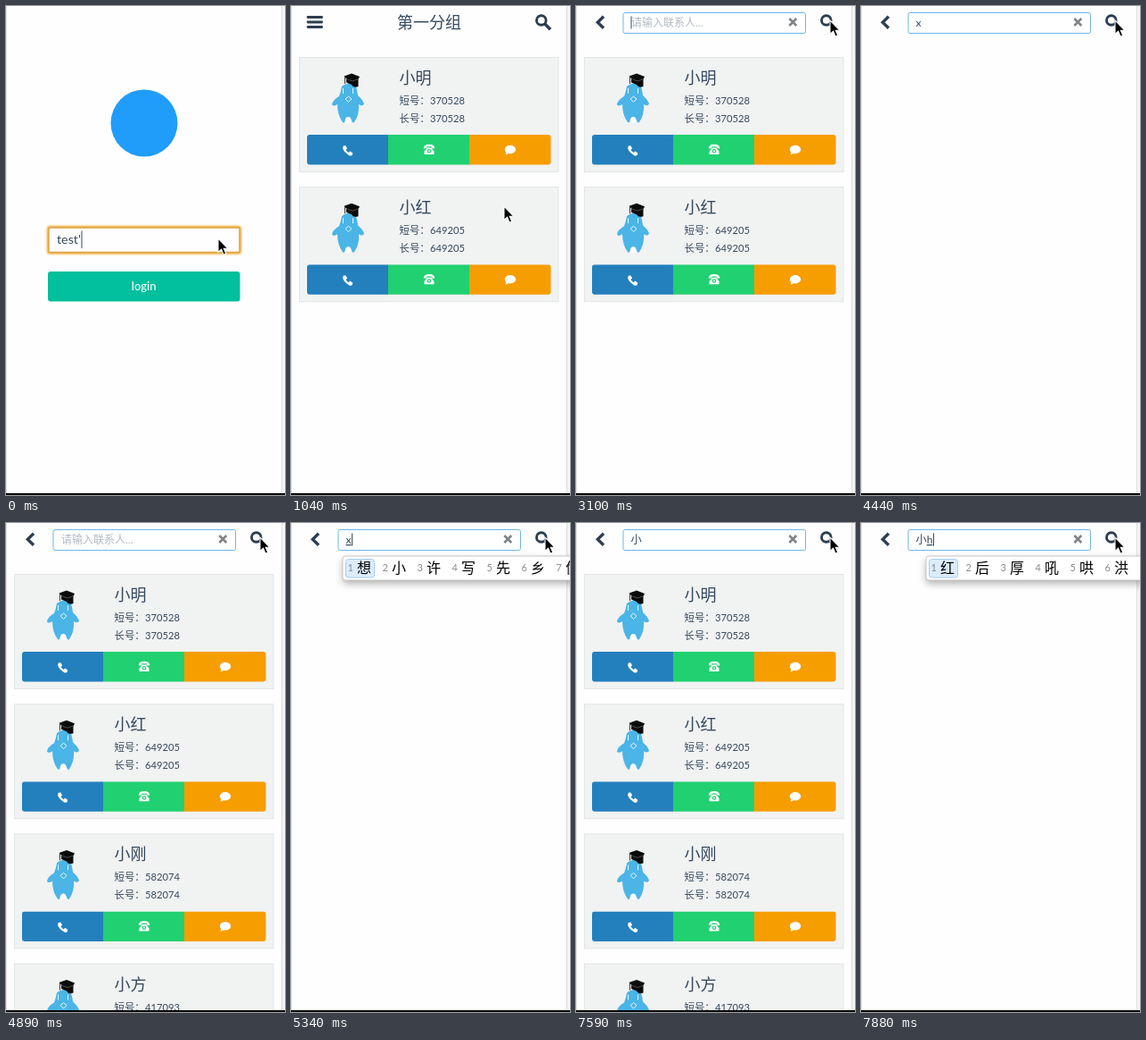
An HTML page that plays this animation: 313 px wide and 547 px high, repeating every 8 s.

```html
<!DOCTYPE html>
<html lang="zh">
<head>
<meta charset="utf-8">
<title>Contacts</title>
<style>
html, body { margin: 0; width: 100%; height: 100%; overflow: hidden; background: #fefefe; }
svg { display: block; width: 313px; height: 547px; }
text { font-family: Lato, "Noto Sans CJK SC", "Noto Sans CJK", sans-serif; fill: #34495e; white-space: pre; }
.big { font-size: 18px; }
.label { font-size: 11.4px; }
.num { font-size: 11.2px; }
.query { font-size: 12.2px; }
.hint { font-size: 12px; fill: #b2bac2; }
.index { font-size: 11px; fill: #8b8b8b; }
.word { font-size: 16px; font-weight: 500; fill: #000; }
.ink { fill: none; stroke: #2c3e50; }
.compose { text-decoration: underline; }
.hidden { display: none; }
</style>
</head>
<body>
<svg viewBox="0 0 313 547">
  <defs>
    <filter id="glow" x="-10%" y="-50%" width="120%" height="200%"><feGaussianBlur stdDeviation="1.1"/></filter>
    <filter id="shade" x="-10%" y="-60%" width="120%" height="260%"><feGaussianBlur stdDeviation="4"/></filter>
    <clipPath id="bar"><rect x="18" y="144" width="273.5" height="33.5" rx="3"/></clipPath>
    <g id="card">
      <rect x="9.5" y="57.5" width="290.5" height="128" fill="#f1f2f2" stroke="#e3e4e4"/>
      <path fill="#4ab5e6" d="M57 90Q56 96 54 101Q47 105 46 110Q47 113 52 110Q52 122 58 130Q60 132 61 127Q64 121 67.500 127Q69 132 71 130Q77 121 76 110Q81 113 82 109Q80 104 75 100Q74 92 72 88Q64 84 57 90Z"/>
      <path fill="none" stroke="#e5f5fc" d="M58.500 92V98M69.500 92V98M61 104l3.500-3 3.500 3-3.500 3.500z"/>
      <path fill="#fff" d="M61 130Q60 124 64.500 124Q68 124 67.500 130Q64 132 61 130Z"/>
      <path fill="#0b0b0b" d="M59.500 78.500L68 75.500 77 79 75.500 82V90Q70 92 68 88L62 85.500V81Z"/>
      <path fill="none" stroke="#777" stroke-width=".6" d="M62 81.500L69 84 76 81.500"/>
      <path fill="none" stroke="#222" stroke-width=".9" d="M60.500 79V87"/>
      <g clip-path="url(#bar)">
        <path fill="#2380bd" d="M18 144h91v34H18z"/>
        <path fill="#21d070" d="M109 144h91v34h-91z"/>
        <path fill="#f69d00" d="M200 144h92v34h-92z"/>
      </g>
      <g fill="#fff">
        <path d="M58.500 156.800l2.600-.8 2 3.200-1.600 1.600q1 2 3.200 3.200l1.600-1.600 3 2.100-.8 2.600q-1.200.8-3.200.1Q59.600 163.600 58.200 159.500Z"/>
        <path d="M148.800 159.500Q148.500 155 155 154.800Q161.500 155 161.200 159.500L157.800 159V157.300H152.200V159Z"/>
        <path d="M152.800 158.500h4.400l3.300 4.300V166h-11v-3.200z"/>
        <circle cx="155" cy="162.300" r="1.700" fill="none" stroke="#21d070" stroke-width="1.200"/>
        <ellipse cx="246" cy="160.500" rx="6.200" ry="4.700"/>
        <path d="M241.500 162l-.8 4.300q3-.3 4.300-2z"/>
      </g>
    </g>
  </defs>

  <rect width="313" height="547" fill="#fefefe"/>

  <g id="login">
    <circle cx="155" cy="131" r="37.500" fill="#209dfb"/>
    <rect x="47.500" y="247.500" width="215" height="28.500" rx="2" fill="#fff" stroke="#eda420" stroke-width="3" filter="url(#glow)"/>
    <rect x="48" y="248" width="214" height="27.500" rx="1" fill="#fefefe" stroke="#dba23a" stroke-width="1.400"/>
    <text id="user" x="57" y="266" font-size="14.300"></text>
    <path id="userCaret" stroke="#34495e" d="M0 251.500V271"/>
    <rect x="47" y="297" width="215.500" height="33.500" rx="3" fill="#02bf9d"/>
    <text x="154.700" y="318" font-size="13" font-weight="500" text-anchor="middle" style="fill:#fff">login</text>
  </g>

  <g id="cards"></g>

  <g id="lens" class="ink">
    <circle cx="280.800" cy="16" r="5.300" stroke-width="2.900"/>
    <path stroke-width="3.500" d="M284.800 20L291 26.200"/>
  </g>
  <g id="title">
    <path class="ink" stroke-width="2.900" stroke-linecap="round" d="M19 12.500H34.500M19 18H34.500M19 23.500H34.500"/>
    <text class="big" x="155" y="24.500" text-anchor="middle">第一分组</text>
  </g>
  <g id="search">
    <path class="ink" stroke-width="3.300" d="M31 11.700L24.300 18.200 31 24.700"/>
    <rect x="53" y="7.500" width="204.500" height="23" rx="2" fill="#fff" stroke="#6db7e8"/>
    <path fill="none" stroke="#808487" stroke-width="2.500" d="M239.300 14l8 8M247.300 14l-8 8"/>
    <text id="hint" class="hint" x="62" y="23">请输入联系人...</text>
    <text id="query" class="query" x="61.500" y="23"><tspan id="done"></tspan><tspan id="typed" class="compose"></tspan></text>
    <path id="caret" stroke="#34495e" d="M0 11.500V25.500"/>
  </g>

  <path stroke="#dedede" d="M.5 0V545"/>
  <path fill="#f4f4f4" d="M309 0h4v545h-4z"/>
  <path stroke="#dedede" d="M309.500 0V545"/>
  <path fill="#000" d="M0 545h313v2H0z"/>

  <g id="popup"></g>
  <path id="cursor" fill="#000" stroke="#fff" stroke-width="1.100" d="M0 0V15.500L3.600 12.200 6 18 8.700 16.900 6.300 11.300H11Z"/>
</svg>

<script>
const LOOP = 8000;
const PITCH = 145.2;
const people = [["小明", "370528"], ["小红", "649205"], ["小刚", "582074"], ["小方", "417093"]];
const $ = id => document.getElementById(id);

// Each entry changes part of the state from its time on.
const steps = [
  [0, { page: "login", user: "test'", userCaret: 85, cards: 0, done: "", typed: "", caret: 0, words: "", cursor: [238, 260] }],
  [150, { userCaret: 0, cursor: [239, 242] }],
  [300, { cursor: [239, 224] }],
  [600, { user: "test" }],
  [740, { userCaret: 82.5 }],
  [1040, { page: "title", cards: 2 }],
  [1180, { cursor: [234, 220] }],
  [1330, { cursor: [225, 213] }],
  [1480, { cursor: [213, 205] }],
  [1630, { cursor: [207, 155] }],
  [1770, { cursor: [203, 100] }],
  [1920, { cursor: [201, 55] }],
  [2070, { cursor: [201, 27] }],
  [2210, { cursor: [226, 24] }],
  [2360, { cursor: [256, 20] }],
  [2500, { cursor: [277, 17] }],
  [2650, { cursor: [285, 16] }],
  [2950, { page: "search" }],
  [3100, { caret: 1 }],
  [3400, { cards: 0, done: "x" }],
  [3700, { done: "xh", caret: 0 }],
  [3840, { caret: 1 }],
  [4140, { done: "x" }],
  [4440, { caret: 0 }],
  [4590, { done: "", cards: 4, caret: 1 }],
  [4890, { caret: 0 }],
  [5340, { cards: 0, typed: "x", caret: 1, words: "想小许写先乡像" }],
  [5490, { typed: "xi", words: "系西洗喜细戏希" }],
  [5640, { typed: "xia", words: "下夏吓瞎虾侠峡" }],
  [5790, { typed: "xiao", words: "小笑校效消晓肖" }],
  [6090, { done: "小", typed: "", words: "", cards: 4 }],
  [6540, { caret: 0 }],
  [7140, { caret: 1 }],
  [7590, { caret: 0 }],
  [7880, { cards: 0, typed: "h", caret: 1, words: "红后厚吼哄洪" }]
];

const show = (id, on) => $(id).classList.toggle("hidden", !on);
const move = (id, x, y = 0) => $(id).setAttribute("transform", `translate(${x} ${y})`);

$("cards").innerHTML = people.map(([name, tel], i) => `
  <g transform="translate(0 ${i * PITCH})">
    <use href="#card"/>
    <text class="big" x="121.5" y="87">${name}</text>
    <text class="label" x="121.5" y="110">短号：</text><text class="num" x="156" y="110">${tel}</text>
    <text class="label" x="121.5" y="129.500">长号：</text><text class="num" x="156" y="129.500">${tel}</text>
  </g>`).join("");

function popup(words, x) {
  if (!words) return "";
  const items = [...words].map((word, i) => {
    const left = x + 5.5 + i * 39;
    return `<text class="index" x="${left}" y="54">${i + 1}</text><text class="word" x="${left + 10.5}" y="56">${word}</text>`;
  });
  const box = `x="${x}" y="37" width="300" height="27" rx="3"`;
  return `<rect ${box} transform="translate(0 4)" fill="#000" opacity=".3" filter="url(#shade)"/>
    <rect ${box} fill="#fff" stroke="#bdbdbd" stroke-width=".8"/>
    <rect x="${x + 3.5}" y="40.500" width="32" height="20.500" rx="3" fill="#dcecfd" stroke="#a8cdf2"/>` + items.join("");
}

function draw(s) {
  show("login", s.page === "login");
  show("title", s.page === "title");
  show("search", s.page === "search");
  show("lens", s.page !== "login");
  [...$("cards").children].forEach((card, i) => card.classList.toggle("hidden", i >= s.cards));
  $("user").textContent = s.user;
  show("userCaret", s.userCaret);
  move("userCaret", s.userCaret);
  $("done").textContent = s.done;
  $("typed").textContent = s.typed;
  const text = s.done + s.typed;
  show("hint", !text);
  show("caret", s.caret);
  move("caret", text && s.page === "search" ? 62.5 + $("query").getComputedTextLength() : 62);
  $("popup").innerHTML = popup(s.words, s.done ? 73 : 58);
  move("cursor", ...s.cursor);
}

const start = performance.now();
let last = -1;
function tick() {
  const t = Math.max(0, performance.now() - start) % LOOP;
  const past = steps.filter(([at]) => at <= t);
  if (past.length !== last) {
    last = past.length;
    draw(Object.assign({}, ...past.map(([, change]) => change)));
  }
  requestAnimationFrame(tick);
}
tick();
</script>
</body>
</html>
```
